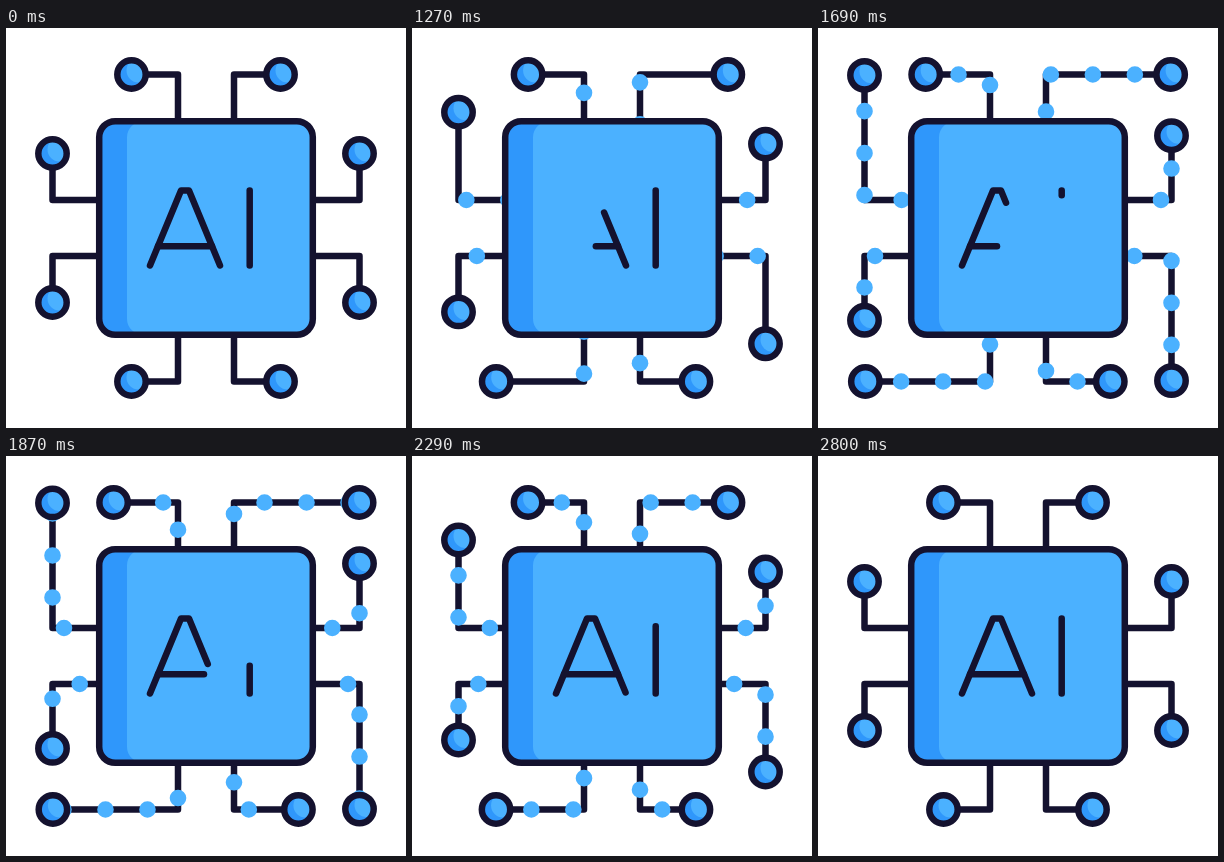
Recreate the animation shown at these times as an HTML page. Size 400 by 400 pixels, loop 2830 ms.

```html
<!DOCTYPE html>
<html lang="en">
<head>
<meta charset="utf-8">
<title>AI chip</title>
<style>
  html, body { margin: 0; width: 100%; height: 100%; overflow: hidden; background: #fff; }
  svg { display: block; width: 100%; height: 100%; }
  .ink { fill: none; stroke: #14122f; stroke-width: 6.5; stroke-linecap: round; stroke-linejoin: round; }
  .dots { fill: none; stroke: #4bb1ff; stroke-width: 16.6; stroke-linecap: round; }
  .light { fill: #4bb1ff; }
  .mid { fill: #2f97fb; }
</style>
</head>
<body>
<svg viewBox="0 0 400 400" role="img" aria-label="AI">
  <defs><clipPath id="disc"><circle r="14"/></clipPath></defs>
  <g id="wires"></g>
  <g id="flow"></g>
  <g id="nodes"></g>
  <rect class="mid" x="93.2" y="93.2" width="213.6" height="213.6" rx="16"/>
  <rect class="light" x="121" y="93.2" width="185.8" height="213.6" rx="16"/>
  <rect class="ink" x="93.2" y="93.2" width="213.6" height="213.6" rx="16"/>
  <path id="legs" class="ink" pathLength="1" d="M144 237.5L175 162.5H183L214 237.5"/>
  <path id="bar" class="ink" pathLength="1" d="M152 218.3H206"/>
  <path id="stem" class="ink" pathLength="1" d="M243.7 237.5V162.5"/>
</svg>
<script>
const LOOP = 2830, START = 1030, STEP = 30;
const RISE = 43.5, REACH = 46.5, GAP = 42, PERIOD = 300;

const $ = id => document.getElementById(id);
const clamp = x => Math.min(1, Math.max(0, x));
const span = (t, from, to) => clamp((t - from) / (to - from));
const smooth = x => x * x * (3 - 2 * x);
const easeOut = x => 1 - (1 - x) ** 3;
const linear = x => x;
const mod = (a, n) => ((a % n) + n) % n;

// cubic-bezier(x1, 0, x2, 1)
function bezier(x1, x2) {
  return x => {
    let lo = 0, hi = 1;
    for (let i = 0; i < 24; i++) {
      const s = (lo + hi) / 2, r = 1 - s;
      if (3 * r * r * s * x1 + 3 * r * s * s * x2 + s ** 3 < x) lo = s; else hi = s;
    }
    return smooth(lo);
  };
}
const stretchOut = bezier(0.34, 0.2), stretchBack = bezier(0.6, 0.4);

function add(parent, tag, attrs) {
  const el = document.createElementNS('http://www.w3.org/2000/svg', tag);
  for (const k in attrs) el.setAttribute(k, attrs[k]);
  return parent.appendChild(el);
}

// Each side of the chip has a short arm and a long arm.
const kinds = [
  { dir: -1, travel: 18, flowTravel: 20 },
  { dir: 1, travel: 79, flowTravel: 78 }
];
const arms = [];
for (let turn = 0; turn < 4; turn++) {
  for (const kind of kinds) {
    const node = add($('nodes'), 'g', {});
    add(node, 'circle', { r: 14.2, class: 'mid' });
    add(node, 'circle', { cx: 7, cy: -4, r: 12, class: 'light', 'clip-path': 'url(#disc)' })
      .removeAttribute('clip-path');
    const shine = node.lastChild;
    const clipped = add(node, 'g', { 'clip-path': 'url(#disc)' });
    clipped.appendChild(shine);
    add(node, 'circle', { r: 14.2, class: 'ink' });
    arms.push({
      ...kind, turn, node,
      wire: add($('wires'), 'path', { class: 'ink' }),
      dots: add($('flow'), 'path', { class: 'dots' })
    });
  }
}

// Point at distance p along an arm, measured from the chip's edge.
function pointAt(arm, p) {
  let x = arm.dir * (28 + Math.max(0, p - RISE));
  let y = -110 - Math.min(p, RISE);
  for (let i = 0; i < arm.turn; i++) [x, y] = [-y, x];
  return [200 + x, 200 + y].map(v => +v.toFixed(2));
}

function drawArm(arm, t, stretch) {
  const end = RISE + REACH + arm.travel * stretch;
  const tipPoint = pointAt(arm, end);
  arm.wire.setAttribute('d', 'M' + [pointAt(arm, -10), pointAt(arm, RISE), tipPoint].join('L'));
  arm.node.setAttribute('transform', `translate(${tipPoint})`);

  let d = '';
  if (t >= START) {
    const length = RISE + REACH + arm.flowTravel * stretch;
    const tip = length * smooth(span(t, 1000, 1682));
    const gone = smooth(span(t, 2200, 2800));
    const tail = gone ? gone * length : -10;
    const phase = mod(34.8 - (t - 2290) * GAP / PERIOD, GAP);
    if (gone < 1) {
      for (let p = tip - phase; p >= tail; p -= GAP) d += `M${pointAt(arm, p)}h.01`;
    }
  }
  arm.dots.setAttribute('d', d);
}

// Wipes a stroke away from its start, then draws it again from its start.
const strokes = [
  { el: $('legs'), wipe: [1004, 1405], draw: [1400, 2500], ease: easeOut },
  { el: $('bar'), wipe: [1034, 1434], draw: [1434, 1946], ease: linear },
  { el: $('stem'), wipe: [1315, 1715], draw: [1715, 2800], ease: easeOut }
];
function drawStroke({ el, wipe, draw, ease }, t) {
  const wiping = t < wipe[1];
  const from = wiping ? span(t, ...wipe) : 0;
  const to = wiping ? 1 : ease(span(t, ...draw));
  el.style.visibility = to - from > 0.002 ? 'visible' : 'hidden';
  el.style.strokeDasharray = `${to - from} 2`;
  el.style.strokeDashoffset = -from;
}

function render(time) {
  const t = time < START ? 0 : START + STEP * Math.floor((time - START) / STEP);
  const stretch = t < 1800
    ? stretchOut(span(t, 1000, 1800))
    : 1 - stretchBack(span(t, 1800, 2800));
  arms.forEach(arm => drawArm(arm, t, stretch));
  strokes.forEach(s => drawStroke(s, t));
}

const origin = performance.now();
function tick() {
  render((performance.now() - origin) % LOOP);
  requestAnimationFrame(tick);
}
tick();
</script>
</body>
</html>
```
